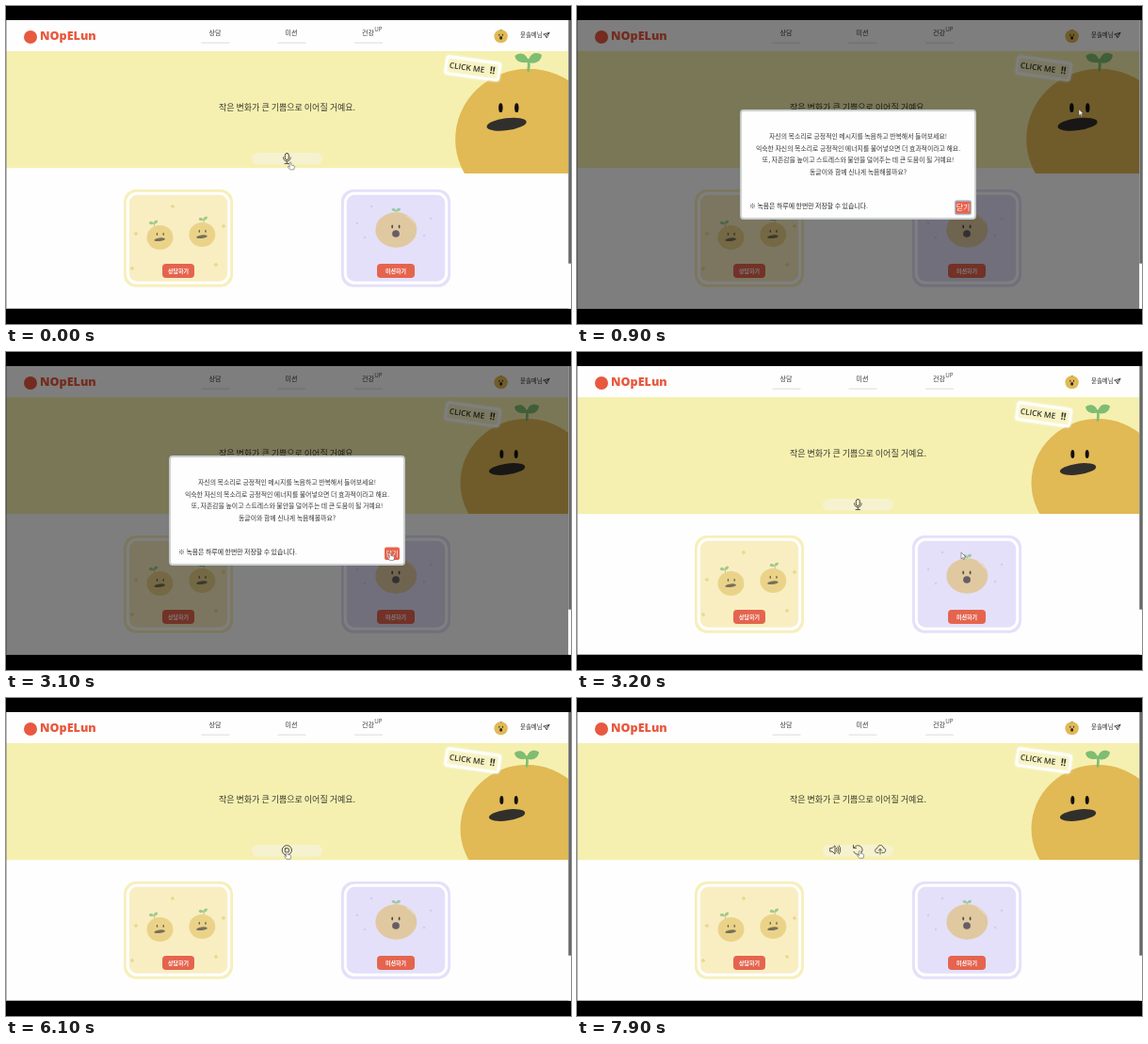
Animation, 600 px wide and 338 px high, one loop 8 s. Source, as an HTML page with a canvas:

```html
<!DOCTYPE html>
<html lang="ko">
<head>
<meta charset="utf-8">
<title>Recording page</title>
<style>
html, body { margin: 0; width: 100%; height: 100%; overflow: hidden; background: #000; }
canvas { display: block; width: 600px; height: 338px; }
</style>
</head>
<body>
<canvas id="stage"></canvas>
<script>
const W = 600, H = 338, LOOP = 8000, STEP = 100;
const TOP = 15, BOTTOM = 321.7, RIGHT = 597.3;
const KR = '"Noto Sans CJK KR", "Noto Sans CJK", sans-serif';
const LATIN = '"Open Sans", "Noto Sans", sans-serif';
const RED = '#e5644e', GOLD = '#e1b955', GREEN = '#7fbd73', INK = '#2b2926';
const OPEN = 900, CLOSE = 3200, RECORD = 5000, DONE = 7900;

const canvas = document.getElementById('stage');
const ctx = canvas.getContext('2d');
const ratio = window.devicePixelRatio || 1;
canvas.width = W * ratio;
canvas.height = H * ratio;

// Cursor tip: time, x, y
const cursorPath = [
  [0, 302, 166], [100, 302, 166], [700, 533, 110], [1000, 533, 110],
  [1800, 519, 82], [2000, 459, 153.5], [2200, 459, 153.5], [2800, 408, 213.5],
  [3300, 408, 213.5], [3900, 299, 164.5], [4000, 298.3, 163.3], [4600, 298.3, 163.3],
  [4700, 299, 164], [4800, 298.3, 163.3], [6600, 298.3, 163.3], [6700, 300.3, 162.3], [LOOP, 300.3, 162.3]
];
const handTimes = [[0, 200], [600, OPEN], [2700, CLOSE], [3800, LOOP]];

const clamp = v => Math.max(0, Math.min(1, v));
const smooth = v => v * v * (3 - 2 * v);
const ramp = (t, from, to) => smooth(clamp((t - from) / (to - from)));
const within = (t, spans) => spans.some(([a, b]) => t >= a && t < b);

function follow(path, t) {
  let i = 1;
  while (i < path.length - 1 && path[i][0] <= t) i++;
  const [ta, xa, ya] = path[i - 1], [tb, xb, yb] = path[i];
  const k = ramp(t, ta, tb);
  return [xa + (xb - xa) * k, ya + (yb - ya) * k];
}

function at(x, y, draw, angle = 0, scale = 1) {
  ctx.save();
  ctx.translate(x, y);
  ctx.rotate(angle);
  ctx.scale(scale, scale);
  draw();
  ctx.restore();
}

function rect(x, y, w, h, color) {
  ctx.fillStyle = color;
  ctx.fillRect(x, y, w, h);
}

function round(x, y, w, h, r, fill, stroke, line = 1) {
  ctx.beginPath();
  ctx.roundRect(x, y, w, h, r);
  if (fill) { ctx.fillStyle = fill; ctx.fill(); }
  if (stroke) { ctx.strokeStyle = stroke; ctx.lineWidth = line; ctx.stroke(); }
}

function oval(x, y, rx, ry, color, angle = 0) {
  ctx.beginPath();
  ctx.ellipse(x, y, rx, ry, angle, 0, Math.PI * 2);
  ctx.fillStyle = color;
  ctx.fill();
}

function text(str, x, y, size, color = '#333', { weight = 400, align = 'center', font = KR } = {}) {
  ctx.font = `${weight} ${size}px ${font}`;
  ctx.textAlign = align;
  ctx.textBaseline = 'middle';
  ctx.fillStyle = color;
  ctx.fillText(str, x, y);
}

function outline(d, color = '#4a4a44', width = 0.9) {
  ctx.strokeStyle = color;
  ctx.lineWidth = width;
  ctx.lineCap = ctx.lineJoin = 'round';
  ctx.stroke(new Path2D(d));
}

// Two leaves meeting on a short stem; the origin is the stem's foot
function sprout(x, y, scale, angle = 0, color = GREEN) {
  at(x, y, () => {
    outline('M0 0 Q1 -5 0 -10', color, 2.6);
    ctx.fillStyle = color;
    ctx.fill(new Path2D('M0 -8 C-4 -7 -12 -7 -13 -14 C-9 -18 -1 -17 0 -8Z'));
    ctx.fill(new Path2D('M0 -8 C1 -18 9 -18 13 -15 C12 -7 4 -6 0 -8Z'));
  }, angle, scale);
}

function header() {
  rect(0, TOP, RIGHT, 33, '#fefefe');
  oval(26, 33, 7, 7, '#e8593f');
  text('NOpELun', 36, 33, 12.6, '#e8593f', { weight: 800, align: 'left', font: LATIN });
  [['상담', 222], ['미션', 303], ['건강', 384.5]].forEach(([label, x]) => {
    text(label, x, 28.7, 7);
    rect(x - 14.5, 38.7, 30, 0.8, '#d4d4d4');
  });
  text('UP', 391.3, 25.2, 6.2, '#444', { align: 'left', font: LATIN });
  oval(525.6, 32.2, 7.2, 7, GOLD);
  sprout(525.6, 26.5, 0.1, 0, '#6d7d48');
  oval(523.8, 30.7, 0.6, 1, INK);
  oval(527.4, 30.7, 0.6, 1, INK);
  oval(525.6, 33.9, 1.5, 1.8, INK);
  text('윤솔메님', 546, 31, 6.4, '#333', { align: 'left' });
  outline('M571 30 L577 28.3 L574.2 34 L573 31.6Z M573 31.6 L577 28.3', '#333', 0.8);
}

function clickTag() {
  at(495.7, 66.3, () => {
    ctx.shadowColor = '#fff';
    ctx.shadowBlur = 3 * ratio;
    round(-28.3, -9, 56.6, 18, 2, '#f7f3c2', '#fff', 2.4);
    ctx.shadowBlur = 0;
    text('CLICK ME', -25, 0.7, 8.4, '#33322a', { weight: 600, align: 'left', font: LATIN });
    text('!!', 18, 0, 10.5, '#33322a', { weight: 700, align: 'left', font: LATIN });
  }, 0.14);
}

function mascot(scale) {
  ctx.save();
  ctx.beginPath();
  ctx.rect(0, TOP, RIGHT, BOTTOM - TOP);
  ctx.clip();
  ctx.translate(536, 113);
  ctx.scale(scale, scale);
  ctx.translate(-536, -113);
  ctx.beginPath();
  ctx.rect(470, 50, 135, 122);
  ctx.clip();
  oval(553, 139, 70.5, 68, GOLD);
  sprout(553, 72.5, 1);
  oval(526.3, 108.6, 2, 4.5, '#111');
  oval(541.7, 108.6, 2, 4.5, '#111');
  oval(532, 124.5, 19.3, 5.9, '#302f2b', -0.13);
  ctx.restore();
}

function cardFrame(x, outer, inner, label, buttonWidth) {
  round(x, 195, 116, 103.7, 13, outer);
  round(x + 4.3, 199.3, 107.4, 95, 10, inner, '#fff', 3);
  round(x + 58 - buttonWidth / 2, 274, buttonWidth, 15, 4, RED);
  text(label, x + 58, 281.6, 6, '#fff', { weight: 700 });
}

function sparkles(points, size, color) {
  points.forEach(([x, y]) => at(x, y, () => rect(-size / 2, -size / 2, size, size, color), 0.95));
}

function smallFace(x, y, leafX, leafY) {
  sprout(x + leafX, y + leafY, 0.37, -0.2, '#a2c989');
  oval(x, y, 14, 13, '#ead389');
  oval(x - 3, y - 3.7, 0.7, 1.6, '#6b624a');
  oval(x + 3.7, y - 3.7, 0.7, 1.6, '#6b624a');
  oval(x - 0.3, y + 2.2, 5.8, 1.8, '#77705c', -0.12);
}

function cards() {
  cardFrame(125, '#f7efbb', '#f9eec2', '상담하기', 34);
  sparkles([[177, 213], [138, 242], [231, 234], [134, 279], [223, 275]], 3.4, '#ead891');
  smallFace(163.5, 246, -6, -11.5);
  smallFace(208.3, 243, 2, -12.5);

  cardFrame(356, '#e4e0fa', '#e4e0fa', '미션하기', 40);
  sparkles([[388, 213], [373, 231], [451, 226], [444, 244], [381, 246]], 2, '#d0c9ee');
  sprout(414.3, 221, 0.37, 0, '#9cc99e');
  oval(414.3, 238, 22, 18.7, '#e0c9a0');
  oval(410.2, 234.5, 0.9, 2, '#524b4c');
  oval(417.6, 234.5, 0.9, 2, '#524b4c');
  oval(414, 242, 3.9, 3.8, '#665e64');
  outline('M426 223 Q431 226 433 230', '#f1e6d3', 0.9);
}

const icons = {
  mic: () => {
    round(-2, -5.3, 4, 7, 2, null, '#45443b', 1);
    outline('M-3.9 -1 C-3.9 4.8 3.9 4.8 3.9 -1 M0 3.5 V5.8 M-2.3 5.8 H2.3', '#45443b', 0.9);
  },
  stop: () => {
    ctx.beginPath();
    ctx.arc(0, 0, 5.1, 0, Math.PI * 2);
    ctx.strokeStyle = '#4a4a44';
    ctx.lineWidth = 1;
    ctx.stroke();
    round(-2, -2, 4, 4, 0.5, null, '#4a4a44', 1);
  },
  sound: () => outline('M-5 -1.8 H-3 L0 -4.5 V4.5 L-3 1.8 H-5Z M1.6 -1.8 Q2.8 0 1.6 1.8 M3 -3.3 Q5.2 0 3 3.3 M4.3 -4.5 Q7.3 0 4.3 4.5'),
  redo: () => outline('M-4.2 -2.2 A4.8 4.8 0 1 1 -4.5 2 M-4.8 -4.8 V-1.8 H-1.8'),
  upload: () => outline('M-2 3.5 H-3.2 C-6.5 3.2 -6 -1 -3.2 -1.2 C-2.5 -5.6 3 -5.4 3.4 -1.6 C6.7 -1.3 6.3 3.4 3.2 3.5 H2 M0 5 V-0.6 M-1.8 1.2 L0 -0.6 L1.8 1.2')
};

function recorder(t) {
  round(261, 156, 75, 12.8, 6.4, '#f6f2cf');
  if (t >= DONE) {
    at(274, 161.3, icons.sound);
    at(298.3, 161.3, icons.redo);
    at(322, 161, icons.upload);
  } else {
    at(298.3, 161.8, t >= RECORD ? icons.stop : icons.mic);
  }
}

function page(t) {
  rect(0, TOP, W, BOTTOM - TOP, '#fefefe');
  rect(0, 48, RIGHT, 124.2, '#f5f0b0');
  header();
  text('작은 변화가 큰 기쁨으로 이어질 거예요.', 298.5, 108, 9, '#3a392f', { weight: 300 });
  recorder(t);
  cards();
  mascot(1.1 - 0.1 * ramp(t, OPEN, OPEN + 300));
  clickTag();
  rect(0, TOP, 0.5, BOTTOM - TOP, '#777');
}

function closeButton(hover) {
  if (hover) round(402, 207.5, 16, 13.5, 2, RED);
  else round(401.5, 207, 17, 14.5, 2, RED, '#a9bfd6', 1.3);
  text('닫기', 410, 214.3, hover ? 7 : 8, '#fff', { weight: 300 });
}

function modal(t) {
  if (t < OPEN || t >= CLOSE) return;
  rect(0, TOP, RIGHT, BOTTOM - TOP, 'rgba(0,0,0,.5)');
  round(174, 111, 249, 115, 3, '#fefefe', '#c9cfcf', 1.8);
  [
    '자신의 목소리로 긍정적인 메시지를 녹음하고 반복해서 들어보세요!',
    '익숙한 자신의 목소리로 긍정적인 에너지를 불어넣으면 더 효과적이라고 해요.',
    '또, 자존감을 높이고 스트레스와 불안을 덜어주는 데 큰 도움이 될 거예요!',
    '동글이와 함께 신나게 녹음해볼까요?'
  ].forEach((line, i) => text(line, 298.5, 138.8 + i * 12.5, 6.9, '#333'));
  text('※ 녹음은 하루에 한번만 저장할 수 있습니다.', 183, 212.3, 6.9, '#222', { weight: 500, align: 'left' });
  closeButton(t >= 2700);
}

function cursor(t) {
  const [x, y] = follow(cursorPath, t);
  const hand = within(t, handTimes);
  at(x, y, () => {
    const shape = new Path2D(hand
      ? 'M-1 0.6 Q0 -0.6 1 0.6 V3.4 L4 4 Q5 4.3 4.8 5.6 L4.2 8.8 H-0.6 L-3 5.6 Q-3 4.5 -1.9 4.9 L-1 5.7Z'
      : 'M0 0 V6.4 L1.5 5 L2.5 7.2 L3.6 6.7 L2.6 4.6 H4.6Z');
    ctx.fillStyle = '#fff';
    ctx.strokeStyle = hand ? '#66645c' : '#444';
    ctx.lineWidth = hand ? 0.7 : 0.5;
    ctx.lineJoin = 'round';
    ctx.fill(shape);
    ctx.stroke(shape);
  }, 0, hand ? 0.9 : 1);
}

function render(t) {
  ctx.setTransform(ratio, 0, 0, ratio, 0, 0);
  rect(0, 0, W, H, '#000');
  page(t);
  modal(t);
  rect(RIGHT, TOP, W - RIGHT, BOTTOM - TOP, '#fefefe');
  rect(RIGHT, TOP, W - RIGHT, 258.7, '#686868');
  cursor(t);
}

const start = performance.now();
function tick() {
  const t = (performance.now() - start) % LOOP;
  render(Math.floor(t / STEP) * STEP);
  requestAnimationFrame(tick);
}
tick();
</script>
</body>
</html>
```
